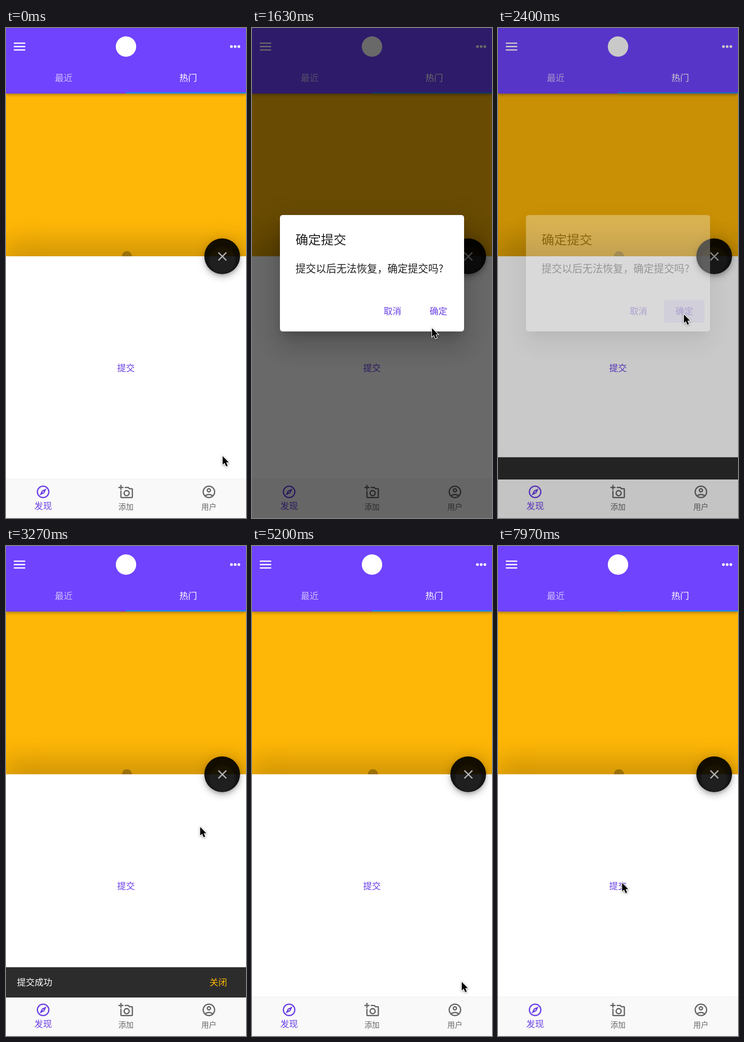
Animation, 524 px wide and 1069 px high, one loop 8 s. Source, as an HTML page:

```html
<!DOCTYPE html>
<html lang="zh-CN">
<head>
<meta charset="utf-8">
<style>
  html, body { margin: 0; width: 100%; height: 100%; overflow: hidden; }
  #stage { position: relative; width: 524px; height: 1069px; overflow: hidden; background: #ffb707;
    font-family: "Noto Sans CJK SC", "Noto Sans CJK", sans-serif; }
  #stage div, #stage svg { position: absolute; left: 0; top: 0; }
  svg { overflow: visible; }
  text { font-size: 19.3px; }
  .medium { font-weight: 500; }
  .small { font-size: 16.5px; }
  .mid { text-anchor: middle; }
  .primary { fill: #6b3fe6; }
  .line { fill: none; stroke: currentColor; stroke-width: 2; }
  #stage .hint { left: 253px; top: 487px; width: 22px; height: 22px; border-radius: 50%; background: #b78508; }
  #stage .sheet { top: 498px; width: 524px; height: 571px; background: #fff;
    box-shadow: 0 -33px 52px 4px rgba(0,0,0,.11), 0 -12px 63px 11px rgba(0,0,0,.09); }
  #stage .fab { left: 433px; top: 459px; width: 78px; height: 78px; border-radius: 50%;
    background: radial-gradient(circle at 39px 48px, rgba(0,0,0,.88) 26px, rgba(0,0,0,.92) 31px);
    box-shadow: 0 4px 7px -1px rgba(0,0,0,.2), 0 8px 14px rgba(0,0,0,.14), 0 1px 25px rgba(0,0,0,.12); }
  .header { width: 524px; height: 143px; background: #7043ff; box-shadow: 0 2px 7px rgba(0,0,0,.4); }
  #stage .rule { top: 983px; width: 524px; height: 2px; background: #f4f4f4; }
  #snack { width: 524px; height: 66px; background: #2c2c2c; }
  #stage .nav { top: 985px; width: 524px; height: 84px; background: #f9f9f9; }
  #shade { width: 524px; height: 1069px; background: #000; }
  #stage .card { left: 61px; top: 408px; width: 402px; height: 254px; border-radius: 6px; background: #fff;
    box-shadow: 0 15px 21px -10px rgba(0,0,0,.2), 0 33px 52px 4px rgba(0,0,0,.12), 0 12px 63px 11px rgba(0,0,0,.08); }
  #stage .button { width: 88px; height: 50px; border-radius: 4px; overflow: hidden; }
  .button div { width: 120px; height: 120px; border-radius: 50%; background: #7043ff; }
  #cursor { filter: drop-shadow(0 1px 2px rgba(0,0,0,.4)); }
</style>
</head>
<body>
<div id="stage">
  <div class="hint"></div>
  <div class="sheet"></div>
  <div class="button" style="left:218px;top:717px"><div id="submitRipple"></div></div>
  <div class="fab"></div>
  <div class="header"></div>
  <svg width="524" height="1069">
    <path d="M17 33.2H42M17 40.5H42M17 47.8H42" stroke="#fff" stroke-width="2.8"/>
    <circle cx="262" cy="40.5" r="22.3" fill="#fff"/>
    <g fill="#fff">
      <circle cx="492.2" cy="40.5" r="3"/><circle cx="500.3" cy="40.5" r="3"/><circle cx="508.4" cy="40.5" r="3"/>
      <text class="mid medium" x="126" y="116.3" opacity=".65">最近</text>
      <text class="mid medium" x="397.7" y="116.3">热门</text>
    </g>
    <rect x="262" y="140" width="262" height="3" fill="#2189f3"/>
    <path d="M463.7 489.7l17.4 17.4m0-17.4l-17.4 17.4" stroke="#b0b0b0" stroke-width="2.8"/>
    <text class="mid medium primary" x="262" y="749.4">提交</text>
  </svg>
  <div class="rule"></div>
  <div id="snack">
    <svg id="snackText" width="524" height="66">
      <text x="24" y="40.3" fill="#fff">提交成功</text>
      <text class="mid medium" x="463.5" y="40.3" fill="#ffb707">关闭</text>
    </svg>
  </div>
  <div class="nav"></div>
  <svg width="524" height="1069">
    <g transform="translate(64.4 995.4) scale(1.385)" color="#6b3fe6">
      <circle class="line" cx="12" cy="12" r="9"/>
      <path fill="currentColor" fill-rule="evenodd" d="M6.5 17.5l7.5-3.5 3.5-7.5L10 10zM12 10.9a1.1 1.1 0 0 1 0 2.2 1.1 1.1 0 0 1 0-2.2z"/>
    </g>
    <g transform="translate(245.4 995.4) scale(1.385)" color="#666">
      <path class="line" d="M4 1V9M0 5H8M10 5h5.6l1.8 2H21q1 0 1 1v12q0 1-1 1H5q-1 0-1-1V10"/>
      <circle class="line" cx="13" cy="14" r="4"/>
    </g>
    <g transform="translate(426.4 995.4) scale(1.385)" color="#666">
      <circle class="line" cx="12" cy="12" r="9"/>
      <circle class="line" cx="12" cy="9.5" r="2.5"/>
      <path class="line" d="M6 18q6-4 12 0"/>
    </g>
    <text class="mid primary" x="81" y="1050.3">发现</text>
    <g fill="#666">
      <text class="mid small" x="262" y="1051">添加</text>
      <text class="mid small" x="443" y="1051">用户</text>
    </g>
  </svg>
  <div id="shade"></div>
  <div id="dialog">
    <div class="card"></div>
    <div class="button" style="left:363px;top:593px"><div id="confirmRipple"></div></div>
    <svg width="524" height="1069" fill="#212121">
      <text class="medium" x="95" y="472.4" style="font-size:27.7px">确定提交</text>
      <text x="95" y="533.2" style="font-size:22.3px">提交以后无法恢复，确定提交吗?</text>
      <text class="mid medium primary" x="306.7" y="625.3">取消</text>
      <text class="mid medium primary" x="407" y="625.3">确定</text>
    </svg>
  </div>
  <svg id="cursor" width="20" height="26">
    <path d="M0 0V18.6L4.2 14.7 7.5 22.3 10.9 20.9 7.7 13.4H13.3Z" stroke="#fff" stroke-width="2.4" paint-order="stroke"/>
  </svg>
</div>
<script>
const LOOP = 8000;
const $ = id => document.getElementById(id);
const clamp = x => Math.max(0, Math.min(1, x));
const span = (t, start, length) => clamp((t - start) / length);
const easeOut = (t, start, length = 450) => 1 - (1 - span(t, start, length)) ** 5;

// pointer tip: time, x, y
const path = [
  [30, 473, 934], [830, 266, 736], [1250, 266, 736], [1630, 393, 655], [1850, 406, 625],
  [3000, 406, 625], [3270, 424, 613], [3800, 470, 935], [3930, 470, 935], [4170, 466, 946],
  [4330, 466, 946], [4530, 458, 951], [5370, 458, 951], [5570, 528, 651], [5800, 528, 700],
  [6100, 478, 806], [7000, 478, 806], [7100, 476, 815], [7430, 476, 815], [7970, 271, 735]
];

function pointer(t) {
  const i = path.findIndex(p => p[0] > t);
  if (i === 0) return path[0].slice(1);
  if (i < 0) return path[path.length - 1].slice(1);
  const [t0, x0, y0] = path[i - 1], [t1, x1, y1] = path[i];
  const u = span(t, t0, t1 - t0), k = u * u * (3 - 2 * u);
  return [x0 + (x1 - x0) * k, y0 + (y1 - y0) * k];
}

function ripple(el, radius, opacity) {
  el.style.transform = `translate(-14px, -35px) scale(${radius / 60})`;
  el.style.opacity = opacity;
}

function draw(t) {
  $('shade').style.opacity = 0.59 * (easeOut(t, 1098) - easeOut(t, 2318));
  $('dialog').style.opacity = easeOut(t, 1117) - easeOut(t, 2305);
  ripple($('submitRipple'), 44 * easeOut(t, 1060), 0.16 * (1 - span(t, 1220, 300)));
  ripple($('confirmRipple'), 60 * easeOut(t, 2240), 0.18);

  const shown = easeOut(t, 2296) - easeOut(t, 4820);
  $('snack').style.transform = `translateY(${985 - 66 * shown}px)`;
  $('snackText').style.opacity = span(t, 2410, 120) - span(t, 4820, 120);

  const [x, y] = pointer(t);
  $('cursor').style.transform = `translate(${x}px, ${y}px)`;
}

const begin = performance.now();
function tick() {
  draw((performance.now() - begin) % LOOP);
  requestAnimationFrame(tick);
}
tick();
</script>
</body>
</html>
```
